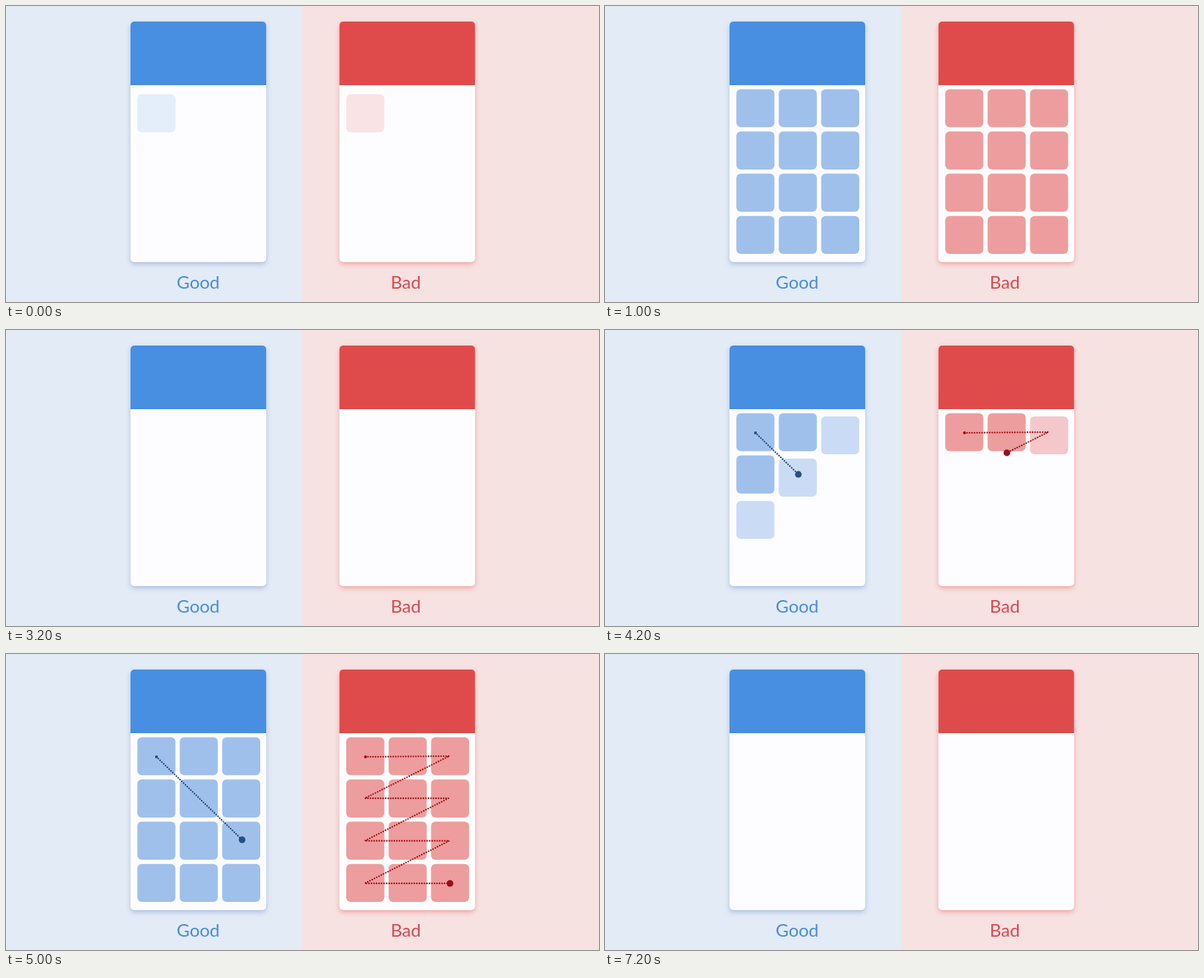
An HTML page that plays this animation: 800x400 px, repeating every 8000 ms.

```html
<!DOCTYPE html>
<html lang="en">
<head>
<meta charset="utf-8">
<title>Staggered grids</title>
<style>
html, body { margin: 0; width: 100%; height: 100%; overflow: hidden; }
svg { display: block; width: 800px; height: 400px; }
text { font: 24px Lato, "Open Sans", sans-serif; text-anchor: middle; }
</style>
</head>
<body>
<svg id="stage" viewBox="0 0 800 400"></svg>
<script>
const LOOP = 8000, STEP = 100, HALF = 4000;
const stage = document.getElementById('stage');

const panels = [
  { bgX: 0, x: 168, label: 'Good', labelX: 259.3, bg: '#e2ebf6', head: '#488fe1',
    tile: '#a0c0ec', text: '#4a8bdc', line: '#1f4672', dot: '#274f80', shadow: '#8fa6d2a0',
    order: (row, col) => row + col,
    points: [[203, 139], [318.5, 251]],
    travel: t => 1 - (1 - clamp((t + 15) / 1040)) ** 3 },
  { bgX: 400, x: 449.8, label: 'Bad', labelX: 539.3, bg: '#f7e2e2', head: '#df4b4a',
    tile: '#ed9d9e', text: '#d9484e', line: '#a50f14', dot: '#981018', shadow: '#ee8484a0',
    order: (row, col) => row * 3 + col,
    points: [[485, 139], [598, 138], [484, 195], [597, 195],
             [484, 252.5], [598, 252.5], [484, 310], [599, 310]],
    travel: t => clamp((t + 15) / 1010) }
];

function clamp(v) { return Math.max(0, Math.min(1, v)); }

function add(parent, tag, attrs) {
  const el = document.createElementNS('http://www.w3.org/2000/svg', tag);
  for (const key in attrs) el.setAttribute(key, attrs[key]);
  return parent.appendChild(el);
}

function build(p) {
  add(stage, 'rect', { x: p.bgX, width: 400, height: 400, fill: p.bg });
  add(stage, 'rect', { x: p.x, y: 21, width: 183, height: 325, rx: 5, fill: '#fdfdff',
    style: `filter: drop-shadow(0 3px 3px ${p.shadow})` });
  add(stage, 'path', { fill: p.head,
    d: `M${p.x} 107V26a5 5 0 0 1 5-5h173a5 5 0 0 1 5 5v81z` });
  add(stage, 'text', { x: p.labelX, y: 381.5, fill: p.text }).textContent = p.label;

  p.tiles = [];
  for (let row = 0; row < 4; row++) {
    for (let col = 0; col < 3; col++) {
      const el = add(stage, 'rect', { x: p.x + 9.2 + col * 57.2, y: 112.4 + row * 57.1,
        width: 51.4, height: 51.4, rx: 6, fill: p.tile });
      p.tiles.push({ el, order: p.order(row, col) });
    }
  }

  const [x, y] = p.points[0];
  p.trail = add(stage, 'g', {});
  p.path = add(p.trail, 'polyline', { fill: 'none', stroke: p.line, 'stroke-width': 2.3,
    'stroke-linecap': 'round', 'stroke-linejoin': 'round', 'stroke-dasharray': '0 3.4' });
  add(p.trail, 'circle', { cx: x, cy: y, r: 2, fill: p.dot });
  p.head = add(p.trail, 'circle', { r: 4.5, fill: p.dot });
}

function pose(p, t, fade, traced) {
  for (const { el, order } of p.tiles) {
    const shown = clamp((t + 35 - order * 82) / 130);
    el.setAttribute('opacity', shown * fade);
    el.setAttribute('transform', `translate(0 ${9.5 * (1 - shown)})`);
  }

  p.trail.setAttribute('opacity', traced ? fade : 0);
  const last = p.points.length - 1;
  const along = p.travel(t) * last;
  const i = Math.min(Math.floor(along), last - 1);
  const [a, b] = [p.points[i], p.points[i + 1]];
  const tip = a.map((v, k) => v + (b[k] - v) * (along - i));
  p.path.setAttribute('points', [...p.points.slice(0, i + 1), tip].join(' '));
  p.head.setAttribute('cx', tip[0]);
  p.head.setAttribute('cy', tip[1]);
}

function draw(now) {
  const time = Math.floor((now - start) % LOOP / STEP) * STEP;
  const traced = time >= 3900;
  const t = traced ? time - HALF : time;
  const fade = traced ? clamp((7150 - time) / 300) : clamp((3200 - time) / 250);
  for (const p of panels) pose(p, t, fade, traced);
  requestAnimationFrame(frame);
}

function frame() { draw(performance.now()); }

panels.forEach(build);
const start = performance.now();
draw(start);
</script>
</body>
</html>
```
